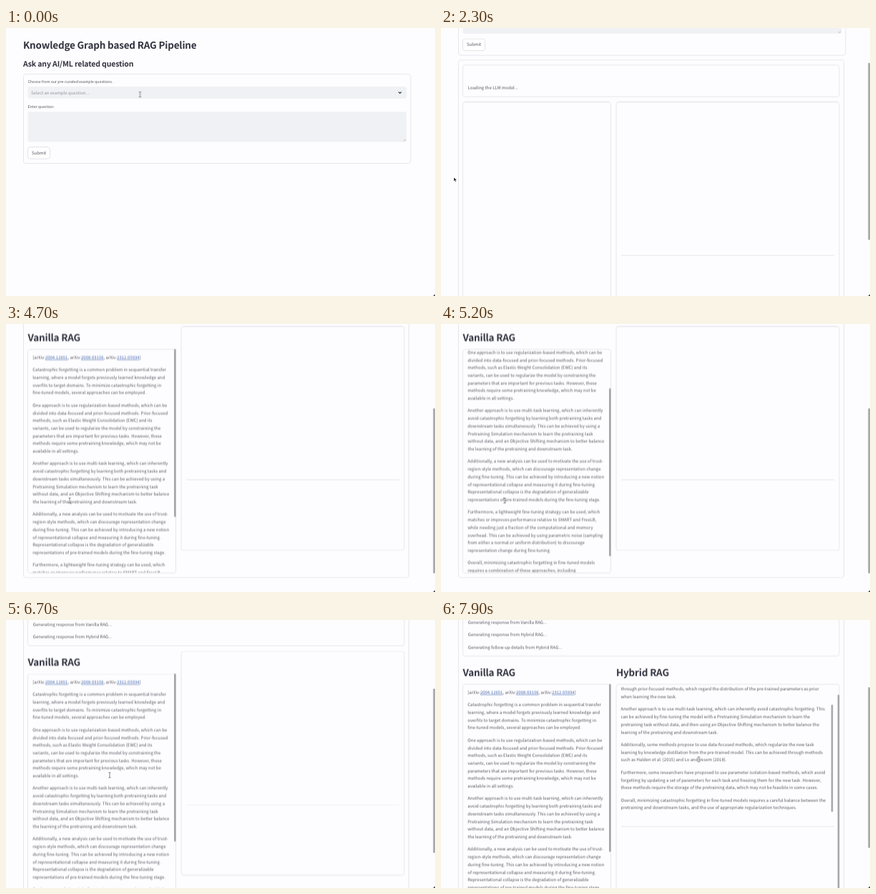
An HTML page for the animation above (8 s loop, 600 px wide and 375 px high).

```html
<!DOCTYPE html>
<html lang="en">
<head>
<meta charset="utf-8">
<title>Knowledge Graph based RAG Pipeline</title>
<style>
html, body { margin: 0; width: 100%; height: 100%; overflow: hidden; background: #fdfcfe; }
svg { display: block; }
text {
  font: 5.99px "Noto Sans CJK JP", "Noto Sans CJK SC", "Noto Sans CJK", "Noto Sans", sans-serif;
  fill: #55565f; text-rendering: geometricPrecision; white-space: pre;
}
.h2, .h3 { font-weight: 600; letter-spacing: -.012em; fill: #31333f; }
.h2 { font-size: 13.47px; }
.h3 { font-size: 10.48px; }
.label { font-size: 5.24px; }
.hint { font-size: 4.5px; fill: #8a8b93; text-anchor: end; }
.muted { fill: #94959d; }
.link { fill: #466bb0; text-decoration: underline; }
.box { fill: none; stroke: #e7e7eb; }
.field { fill: #eff1f4; }
.thumb { fill: #a7a7a9; }

/* Every part runs on one 8 s clock; 1.25% is one 100 ms tick. */
.a { animation: 8s step-end infinite; }
.at14 { animation-name: at14; }
.at17 { animation-name: at17; }
.at28 { animation-name: at28; }
.at38 { animation-name: at38; }
.at70 { animation-name: at70; }
@keyframes at14 { 0% { opacity: 0 } 17.5% { opacity: 1 } }
@keyframes at17 { 0% { opacity: 0 } 21.25% { opacity: 1 } }
@keyframes at28 { 0% { opacity: 0 } 35% { opacity: 1 } }
@keyframes at38 { 0% { opacity: 0 } 47.5% { opacity: 1 } }
@keyframes at70 { 0% { opacity: 0 } 87.5% { opacity: 1 } }

#page { animation-name: page; }
@keyframes page {
  0% { transform: translateY(0) }
  25% { transform: translateY(0); animation-timing-function: steps(6, start) }
  32.5% { transform: translateY(-227px) }
  52.5% { transform: translateY(-227px); animation-timing-function: steps(4, start) }
  57.5% { transform: translateY(-286.5px) }
  81.25% { transform: translateY(-286.5px); animation-timing-function: steps(2, start) }
  83.75% { transform: translateY(-246.5px) }
  98.75% { transform: translateY(-249.5px) }
}
#pageThumb { animation-name: pageThumb; }
@keyframes pageThumb {
  0% { opacity: 0; y: -40px; height: 250px }
  17.5% { opacity: 1; y: -40px; height: 250px }
  25% { opacity: 1; y: -40px; height: 250px; animation-timing-function: steps(6, start) }
  32.5% { opacity: 1; y: 93px; height: 247px }
  47.5% { opacity: 1; y: 86px; height: 231px }
  52.5% { opacity: 1; y: 86px; height: 231px; animation-timing-function: steps(4, start) }
  57.5% { opacity: 1; y: 118px; height: 231px }
  81.25% { opacity: 1; y: 118px; height: 231px; animation-timing-function: steps(2, start) }
  83.75% { opacity: 1; y: 96px; height: 230px }
  87.5% { opacity: 1; y: 93px; height: 225px }
  98.75% { opacity: 1; y: 94px; height: 225px }
}

#cols { animation-name: cols; }
@keyframes cols {
  0% { transform: translateY(237px) }
  21.25% { transform: translateY(254.5px) }
  35% { transform: translateY(272px) }
  47.5% { transform: translateY(289.5px) }
  87.5% { transform: translateY(307px) }
}
#status { animation-name: status; }
@keyframes status {
  0% { height: 27px }
  21.25% { height: 44.5px }
  35% { height: 62px }
  47.5% { height: 79.5px }
  87.5% { height: 97px }
}
#card { animation-name: card; }
@keyframes card {
  0% { height: 361.5px }
  21.25% { height: 379px }
  35% { height: 396.5px }
  47.5% { height: 445.5px }
  87.5% { height: 463px }
}
#left { animation-name: left; }
#right { animation-name: right; }
@keyframes left { 0% { transform: translateY(0) } 47.5% { transform: translateY(32px) } }
@keyframes right { 0% { transform: translateY(0) } 87.5% { transform: translateY(32px) } }

#focus { animation-name: focus; }
@keyframes focus { 0% { opacity: 0 } 5% { opacity: 1 } 16.25% { opacity: 0 } }
#hint { animation-name: hint; }
@keyframes hint { 0% { opacity: 0 } 6.25% { opacity: 1 } 16.25% { opacity: 0 } }
#typing { animation-name: typing; }
@keyframes typing {
  0% { transform: translateX(0) }
  6.25% { transform: translateX(0); animation-timing-function: steps(5, start) }
  12.5% { transform: translateX(189.5px) }
}

#leftText { animation-name: leftText; }
@keyframes leftText {
  0% { transform: translateY(0) }
  62.5% { transform: translateY(0); animation-timing-function: steps(3, start) }
  66.25% { transform: translateY(-74px); animation-timing-function: steps(2, start) }
  68.75% { transform: translateY(-104px) }
  71.25% { transform: translateY(-104px); animation-timing-function: steps(6, start) }
  78.75% { transform: translateY(0) }
}
#leftThumb { animation-name: leftThumb; }
@keyframes leftThumb {
  0% { transform: translateY(0) }
  62.5% { transform: translateY(0); animation-timing-function: steps(3, start) }
  66.25% { transform: translateY(55px); animation-timing-function: steps(2, start) }
  68.75% { transform: translateY(78px) }
  71.25% { transform: translateY(78px); animation-timing-function: steps(6, start) }
  78.75% { transform: translateY(0) }
}
#rightText { animation-name: rightText; }
@keyframes rightText {
  0% { transform: translateY(0) }
  92.5% { transform: translateY(0); animation-timing-function: steps(3, start) }
  96.25% { transform: translateY(-48px) }
}
#rightThumb { animation-name: rightThumb; }
@keyframes rightThumb {
  0% { transform: translateY(0) }
  92.5% { transform: translateY(0); animation-timing-function: steps(3, start) }
  96.25% { transform: translateY(38px) }
}
#panel { animation-name: panel; }
@keyframes panel {
  0% { transform: translateY(0) }
  95% { transform: translateY(0); animation-timing-function: steps(2, start) }
  97.5% { transform: translateY(-16px) }
}
#panelThumb { animation-name: panelThumb; }
@keyframes panelThumb {
  0% { transform: translateY(0) }
  95% { transform: translateY(0); animation-timing-function: steps(2, start) }
  97.5% { transform: translateY(15px) }
}

#mouse { animation-name: mouse; }
@keyframes mouse {
  0% { transform: translate(187.5px, 93px) }
  1.25% { transform: translate(187.5px, 93px); animation-timing-function: steps(3, start) }
  5% { transform: translate(155.5px, 129px) }
  16.25% { transform: translate(155.5px, 129px); animation-timing-function: steps(2, start) }
  18.75% { transform: translate(46px, 174px) }
  23.75% { transform: translate(46px, 174px); animation-timing-function: steps(3, start) }
  27.5% { transform: translate(18px, 209px) }
  51.25% { transform: translate(18px, 209px); animation-timing-function: steps(5, start) }
  57.5% { transform: translate(89px, 247px) }
  81.25% { transform: translate(89px, 247px); animation-timing-function: steps(2, start) }
  83.75% { transform: translate(145px, 217px) }
  87.5% { transform: translate(145px, 217px); animation-timing-function: steps(4, start) }
  92.5% { transform: translate(360.5px, 195px) }
}
#beam { animation-name: beam; }
#arrow { animation-name: arrow; }
@keyframes beam { 0% { opacity: 1 } 16.25% { opacity: 0 } 56.25% { opacity: 1 } }
@keyframes arrow { 0% { opacity: 0 } 16.25% { opacity: 1 } 56.25% { opacity: 0 } }
</style>
</head>
<body>
<svg width="600" height="375" viewBox="0 0 600 375">
  <g id="page" class="a">
    <text class="h2" x="24" y="28.8">Knowledge Graph based RAG Pipeline</text>
    <text class="h3" x="24" y="53.5">Ask any AI/ML related question</text>

    <rect class="box" x="24.5" y="64.5" width="541.5" height="125" rx="3.3"/>
    <text class="label" x="30.5" y="77.2">Choose from our pre-curated example questions.</text>
    <rect class="field" x="30.5" y="82" width="529.5" height="16.7" rx="3.3"/>
    <text class="muted" x="35" y="92.5">Select an example question...</text>
    <path d="M549 89.4l2 2 2-2" fill="none" stroke="#31333f" stroke-width="1.1"/>
    <text class="label" x="30.5" y="112.4">Enter question:</text>
    <rect class="field" x="30.5" y="117.3" width="529.5" height="42" rx="3.3"/>
    <path d="M556 158.5l3-3M558 158.5l1-1" stroke="#8a8b93" stroke-width=".5"/>
    <text x="37.8" y="131.1">How can catastrophic forgetting be minimized in fine-tuned models?</text>
    <g id="typing" class="a">
      <rect class="field" x="37.5" y="122" width="210" height="14"/>
      <rect id="focus" class="a" x="37.6" y="125" width=".7" height="8" fill="#31333f"/>
    </g>
    <g id="hint" class="a">
      <rect x="30.5" y="117.3" width="529.5" height="42" rx="3.3" fill="none" stroke="#e59aa0" stroke-width=".8"/>
      <text class="hint" x="557.5" y="157.3">Press ⌘+Enter to submit form</text>
    </g>
    <rect x="30.5" y="166.5" width="31" height="16.5" rx="3.3" fill="#fff" stroke="#e2e2e7"/>
    <text x="36" y="176.7">Submit</text>

    <g class="a at14">
      <rect id="card" class="box a" x="24.5" y="196" width="539" rx="3.3"/>
      <rect id="status" class="box a" x="30.5" y="203" width="526.5" rx="3.3"/>
      <text class="a at17" x="37.8" y="237.2">Loading the LLM model...</text>
      <text class="a at28" x="37.8" y="254.7">Generating response from Vanilla RAG...</text>
      <text class="a at38" x="37.8" y="272.2">Generating response from Hybrid RAG...</text>
      <text class="a at70" x="37.8" y="289.7">Generating follow-up details from Hybrid RAG...</text>

      <g id="cols" class="a">
        <text class="h2 a at38" x="30.5" y="21">Vanilla RAG</text>
        <text class="h2 a at70" x="245" y="21">Hybrid RAG</text>
        <g id="left" class="a">
          <rect class="box" x="30.5" y=".5" width="207" height="313" rx="3.3"/>
          <g class="a at38">
            <svg x="31" y="1" width="204" height="312"><g id="leftText" class="a"></g></svg>
            <rect id="leftThumb" class="thumb a" x="235" y="0" width="2.7" height="235" rx="1.3"/>
          </g>
        </g>
        <g id="right" class="a">
          <rect class="box" x="245" y=".5" width="312" height="313.5" rx="3.3"/>
          <svg x="246" y="1" width="311" height="312.5">
            <g id="panel" class="a">
              <path d="M6 214.5h298" stroke="#e7e7eb"/>
              <g class="a at70">
                <svg y="6" width="300" height="188"><g id="rightText" class="a"></g></svg>
                <rect id="rightThumb" class="thumb a" x="299.7" y="6" width="2.5" height="150" rx="1.2"/>
              </g>
            </g>
          </svg>
          <g class="a at70">
            <rect id="panelThumb" class="thumb a" x="554.7" y="0" width="2.5" height="295" rx="1.2"/>
          </g>
        </g>
      </g>
    </g>
  </g>

  <rect id="pageThumb" class="thumb a" x="597.4" width="2.6" rx="1.3"/>
  <path d="M600 372q-.5 2.5-3 3h3z" fill="#222"/>
  <g id="mouse" class="a">
    <path id="beam" class="a" d="M-1.5-3.8Q0-3.8 0-2.8Q0-3.8 1.5-3.8M0-3V3M-1.5 3.8Q0 3.8 0 2.8Q0 3.8 1.5 3.8" fill="none" stroke="#55565f" stroke-width=".7"/>
    <path id="arrow" class="a" d="M0 0V5.4L1.3 4.2 2.2 6.3 3.2 5.9 2.3 3.9H4z" fill="#111" stroke="#fff" stroke-width=".4"/>
  </g>
</svg>
<script>
const LINE = 10.71, GAP = 6.72;

const cite = '[' + ['2004.12651', '2008.03156', '2312.05934']
  .map(id => `arXiv:<tspan class="link">${id}</tspan>`).join(', ') + ']';

// One text element per line; a blank line starts a new paragraph.
function setLines(id, x, y, copy) {
  let out = '';
  for (const line of (cite + '\n\n' + copy.trim()).split('\n')) {
    if (line) out += `<text x="${x}" y="${y.toFixed(2)}">${line}</text>`;
    y += line ? LINE : GAP;
  }
  document.getElementById(id).innerHTML = out;
}

setLines('leftText', 6.3, 12.8, `
Catastrophic forgetting is a common problem in sequential transfer
learning, where a model forgets previously learned knowledge and
overfits to target domains. To minimize catastrophic forgetting in
fine-tuned models, several approaches can be employed.

One approach is to use regularization-based methods, which can be
divided into data-focused and prior-focused methods. Prior-focused
methods, such as Elastic Weight Consolidation (EWC) and its
variants, can be used to regularize the model by constraining the
parameters that are important for previous tasks. However, these
methods require some pretraining knowledge, which may not be
available in all settings.

Another approach is to use multi-task learning, which can inherently
avoid catastrophic forgetting by learning both pretraining tasks and
downstream tasks simultaneously. This can be achieved by using a
Pretraining Simulation mechanism to learn the pretraining task
without data, and an Objective Shifting mechanism to better balance
the learning of the pretraining and downstream task.

Additionally, a new analysis can be used to motivate the use of trust-
region-style methods, which can discourage representation change
during fine-tuning. This can be achieved by introducing a new notion
of representational collapse and measuring it during fine-tuning.
Representational collapse is the degradation of generalizable
representations of pre-trained models during the fine-tuning stage.

Furthermore, a lightweight fine-tuning strategy can be used, which
matches or improves performance relative to SMART and FreeLB,
while needing just a fraction of the computational and memory
overhead. This can be achieved by using parametric noise (sampling
from either a normal or uniform distribution) to discourage
representation change during fine-tuning.

Overall, minimizing catastrophic forgetting in fine-tuned models
requires a combination of these approaches, including
regularization-based methods, multi-task learning and
lightweight fine-tuning strategies.`);

setLines('rightText', 5.5, 6, `
Catastrophic forgetting is a common problem in sequential transfer learning, where a model
forgets previously learned knowledge and overfits to target domains. To minimize catastrophic
forgetting in fine-tuned models, several approaches can be employed. One approach is to use
regularization-based methods, which constrain the model parameters. This can be achieved
through prior-focused methods, which regard the distribution of the pre-trained parameters as prior
when learning the new task.

Another approach is to use multi-task learning, which can inherently avoid catastrophic forgetting. This
can be achieved by fine-tuning the model with a Pretraining Simulation mechanism to learn the
pretraining task without data, and then using an Objective Shifting mechanism to better balance the
learning of the pretraining and downstream task.

Additionally, some methods propose to use data-focused methods, which regularize the new task
learning by knowledge distillation from the pre-trained model. This can be achieved through methods
such as Halden et al. (2015) and Lo and Vesem (2018).

Furthermore, some researchers have proposed to use parameter isolation-based methods, which avoid
forgetting by updating a set of parameters for each task and freezing them for the new task. However,
these methods require the storage of the pretraining data, which may not be feasible in some cases.

Overall, minimizing catastrophic forgetting in fine-tuned models requires a careful balance between the
pretraining and downstream tasks, and the use of appropriate regularization techniques.`);
</script>
</body>
</html>
```
